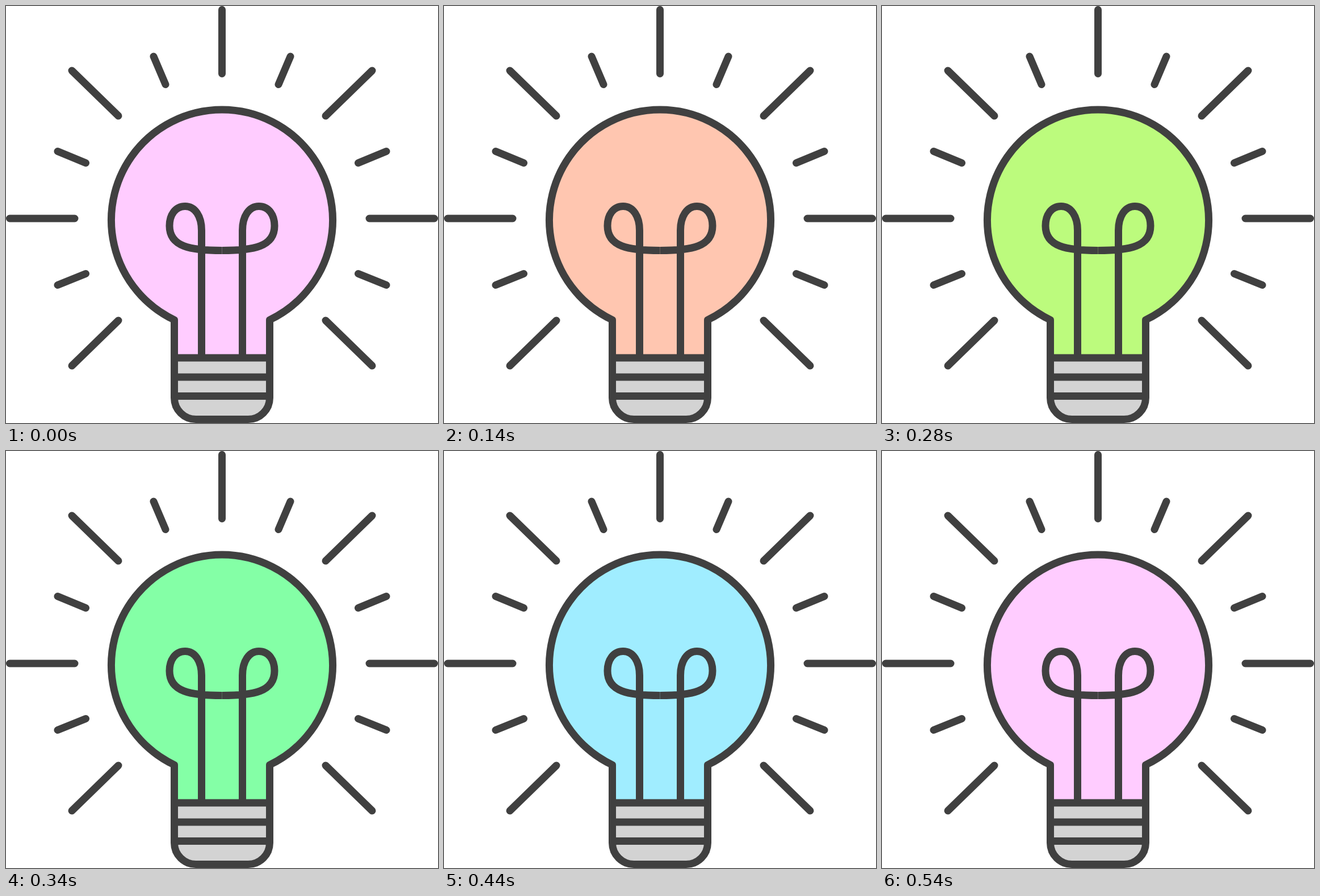
Recreate the animation shown at these times as an HTML page without scripts. Size 761 by 736 pixels, loop 0.58 s.

```html
<!DOCTYPE html>
<html lang="en">
<head>
<meta charset="utf-8">
<title>Light bulb</title>
<style>
  html, body { margin: 0; width: 100%; height: 100%; overflow: hidden; background: #fff; }
  svg { display: block; width: 100%; height: 100%; }
  .ink { fill: none; stroke: #404040; stroke-width: 13; stroke-linecap: round; stroke-linejoin: round; }
  .flat { stroke-linecap: butt; }
  .base { fill: #d3d3d3; }
  .glass { animation: glow 580ms step-end infinite; }

  /* Hard colour changes around the hue wheel */
  @keyframes glow {
    0%     { fill: #ffccff; }
    10.34% { fill: #ffc7ee; }
    13.79% { fill: #ffc2dc; }
    24.13% { fill: #ffc6b0; }
    34.48% { fill: #ffe47a; }
    48.27% { fill: #bcfb7d; }
    58.62% { fill: #84ffa6; }
    68.96% { fill: #77ffe9; }
    75.86% { fill: #a0edff; }
    86.20% { fill: #c6e0ff; }
    93.10%, 100% { fill: #ffccff; }
  }
</style>
</head>
<body>
<svg viewBox="0 0 761 736">
  <defs>
    <path id="rays" d="M6.5 375H121M116 114L198 194M116 635L198 555M260 89L281 138.500M91 256.500L140.500 277M91 492.500L140.500 472.500"/>
    <path id="filament" d="M344.500 621V396C344.500 371 333 353.500 315.500 353.500S288 369 288 388C288 425 325 431.500 380.500 431.500"/>
    <path id="outline" d="M296.500 554A195 195 0 1 1 464.500 554V691.500A38 38 0 0 1 426.500 729.500H334.500A38 38 0 0 1 296.500 691.500Z"/>
  </defs>

  <use href="#outline" class="glass"/>
  <path class="base" d="M296.500 621H464.500V691.500A38 38 0 0 1 426.500 729.500H334.500A38 38 0 0 1 296.500 691.500Z"/>

  <g class="ink">
    <path d="M380.500 6.500V119.500"/>
    <use href="#rays"/>
    <use href="#rays" transform="matrix(-1 0 0 1 761 0)"/>
    <g class="flat">
      <use href="#filament"/>
      <use href="#filament" transform="matrix(-1 0 0 1 761 0)"/>
      <path d="M296.500 621H464.500M296.500 655H464.500M296.500 688.500H464.500"/>
    </g>
    <use href="#outline"/>
  </g>
</svg>
</body>
</html>
```
